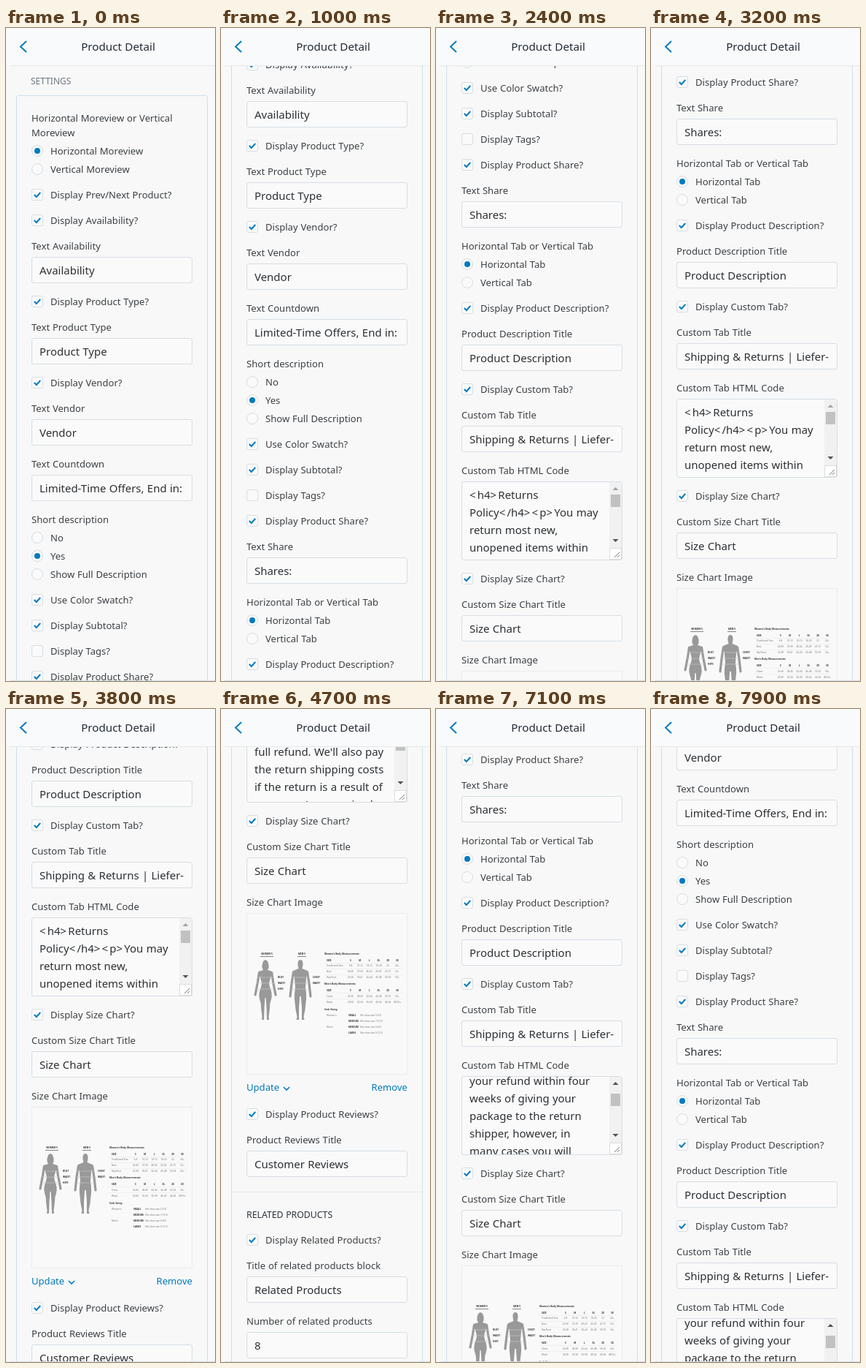
Write an HTML page that moves like this. It is 287x893 px and loops after 8 s.

```html
<!DOCTYPE html>
<html lang="en">
<head>
<meta charset="utf-8">
<title>Product Detail</title>
<style>
html, body { margin: 0; width: 100%; height: 100%; overflow: hidden; background: #f8f8f8; }
svg { display: block; }
text { font: 13.08px "Noto Sans", "Open Sans", sans-serif; word-spacing: .4px; fill: #3b4045; white-space: pre; }
.field { font-size: 14.98px; fill: #2c3034; }
.angle { letter-spacing: 2.2px; }
.title { font-size: 15.2px; font-weight: 500; fill: #212b36; }
.head { font-size: 12px; font-weight: 500; fill: #6b7580; }
.dark { font-size: 12.3px; fill: #2b333b; }
.link { fill: #007ab8; }
.tiny { font-size: 3.2px; word-spacing: 0; fill: #777; }
.bold { font-weight: 700; fill: #333; }
.box { fill: #fafafa; stroke: #d5dee6; }
.tick { fill: none; stroke: #007ac0; stroke-width: 2; }
.edge { fill: none; stroke: #cfdfec; }
.arm { fill: none; stroke: #999; stroke-width: 3.2; stroke-linecap: round; stroke-linejoin: round; }
</style>
</head>
<body>
<svg width="287" height="893" viewBox="0 0 287 893">
  <svg y="52" width="287" height="840"><g id="page"></g></svg>
  <rect width="287" height="51" fill="#f9fafb"/>
  <path d="M5 51.5H287" stroke="#e4e9ed"/>
  <path d="M5 892.5H287" stroke="#d6e2ec"/>
  <path d="M28 18L20 25.5L28 33" class="tick"/>
  <text x="154" y="31" text-anchor="middle" class="title">Product Detail</text>
</svg>
<script>
const page = document.getElementById("page");
let out = "";
const add = s => out += s;
const esc = s => s.replace(/[&<>]/g, c => c === "&" ? "&amp;" :
  `<tspan class="angle">${c === "<" ? "&lt;" : "&gt;"}</tspan>`);
const text = (x, y, s, cls = "", extra = "") =>
  add(`<text x="${x}" y="${y}" class="${cls}" ${extra}>${esc(s)}</text>`);

// Form parts are placed by their vertical centre.
const label = (y, s) => text(35, y + 5, s);
const check = (y, s, on = true) => {
  add(`<rect x="35.5" y="${y - 7.5}" width="15" height="15" rx="2.5" class="box"/>`);
  if (on) add(`<path d="M38.8 ${y}l3 3l5.4-6" class="tick"/>`);
  text(61, y + 5, s);
};
const radio = (y, s, on) => {
  add(`<circle cx="43" cy="${y}" r="7.5" class="box"/>`);
  if (on) add(`<circle cx="43" cy="${y}" r="4" fill="#007ac0"/>`);
  text(61, y + 5, s);
};
const input = (y, name, s) => {
  label(y - 33, name);
  add(`<rect x="35.5" y="${y - 17.5}" width="220" height="35" rx="2.5" class="box"/>`);
  text(46, y + 6, s, "field");
};

function textArea(y) {
  const lines = ["<h4>Returns", "Policy</h4><p>You may", "return most new,",
    "unopened items within", "30 days of delivery for a", "full refund. We'll also pay",
    "the return shipping costs", "if the return is a result of", "our error (you received an",
    "incorrect or defective", "item, etc.).</p><p>You", "should expect to receive",
    "your refund within four", "weeks of giving your", "package to the return",
    "shipper, however, in", "many cases you will", "receive a refund more"];
  add(`<rect x="35.5" y="${y + .5}" width="220" height="107" rx="2.5" class="box"/>
    <svg x="36" y="${y + 1}" width="202" height="106"><g id="lines">`);
  lines.forEach((s, i) => text(10, 23 + 24 * i, s, "field"));
  add(`</g></svg><g transform="translate(238 ${y + 1})">
    <rect width="17" height="90" fill="#f1f1f1"/>
    <path id="up" d="M4.5 11L8.5 7L12.5 11Z"/>
    <path d="M4.5 78L8.5 82L12.5 78Z" fill="#505050"/>
    <rect id="thumb" x="2" y="17" width="13" height="17" fill="#c1c1c1"/>
    <rect x=".5" y="90.5" width="16" height="15" fill="#fff" stroke="#dcdcdc"/>
    <path d="M7 103L14 96M11 103L14 100" stroke="#777"/></g>`);
}

function sizeChart(top) {
  add(`<g transform="translate(0 ${top})">
    <rect x="35.5" y=".5" width="220" height="220" fill="#f9f9f9" stroke="#ececec"/>`);
  // Each figure is one half and its mirror image.
  const body = (x, half, arm) => {
    for (const side of [1, -1])
      add(`<g transform="translate(${x} 64) scale(${side} 1)">
        <path d="${half}" fill="#999"/><path d="${arm}" class="arm"/></g>`);
    add(`<path d="M${x - 12} 88h24m-24 8h24m-24 8h24" stroke="#ccc" stroke-width=".6"/>`);
  };
  body(61, "M0 0Q5 1 4.5 11L3 14L9.5 16L7 25Q4 32 6 37Q10 46 8 54Q5.5 60 6 66L4.5 78L5 82H2L1.5 66L.6 52H0Z",
    "M8.6 17.5L10.5 30L14 48");
  body(109, "M0 0Q4 0 3.5 7L2.5 12L10 15L8 26L7 38Q9 50 7.5 58L6.5 68L4.5 78L5.5 82H2L2 66L.8 50H0Z",
    "M9.6 17L11.8 31L14 50");
  const mid = 'text-anchor="middle"';
  const tiny = (x, y, s, bold, extra) => text(x, y + 1.2, s, bold ? "tiny bold" : "tiny", extra);
  tiny(63, 56, "WOMEN'S", 1, mid);
  tiny(111, 56, "MEN'S", 1, mid);
  add('<path d="M54 59.5h18M105 59.5h12" stroke="#555" stroke-width=".7"/>');
  ["BUST", "WAIST", "HIPS"].forEach((s, i) => tiny(78, 88 + 8 * i, s, 1));
  ["CHEST", "WAIST"].forEach((s, i) => tiny(126, 88 + 8 * i, s, 1));
  const row = (y, name, cells, bold) => {
    tiny(145, y, name, bold);
    cells.split(" ").forEach((s, i) => tiny(178 + 12.8 * i, y, s, bold, mid));
  };
  const sizes = "S M L XL 2X 3X";
  tiny(142, 56, "Women's Body Measurements", 1);
  row(65, "SIZE", sizes, 1);
  row(72, "Traditional Size", "6-8 10-12 14-16 18-20 22 24+");
  row(80, "Bust", "34-36 37-39 40-42 43-45 47-51 52+");
  row(88, "Hip/Seat", "36-38 39-41 42-44 45-48 50-53 54+");
  tiny(142, 97, "Men's Body Measurements", 1);
  row(106, "SIZE", sizes, 1);
  row(114, "Chest", "34-36 38-40 42-44 46-48 50-52 54+");
  row(122, "Waist", "28-30 32-34 36-38 40-42 44-46 48-50+");
  for (const y of [68, 76, 84, 109, 117])
    add(`<path d="M142 ${y + .5}h106" stroke="#e4e4e4" stroke-width=".5"/>`);
  tiny(142, 132, "Sock Sizing", 1);
  [["Women's", "SMALL", "5-6.5"], ["", "MEDIUM", "7-10.5"],
   ["Men's", "MEDIUM", "6-8.5"], ["", "LARGE", "9-12.5"]].forEach(([who, size, fit], i) => {
    const y = 140 + 8 * i;
    tiny(145, y, who);
    tiny(175, y, size, 1);
    tiny(191, y, `(fits shoe size ${fit})`);
  });
  add("</g>");
}

text(34, 77, "SETTINGS", "head");
add('<path d="M14.5 2400V94.5q0-2 2-2H274.5q2 0 2 2V2400" class="edge"/>');
label(123, "Horizontal Moreview or Vertical");
label(143, "Moreview");
radio(168, "Horizontal Moreview", true);
radio(193, "Vertical Moreview");
check(228, "Display Prev/Next Product?");
check(263, "Display Availability?");
input(331, "Text Availability", "Availability");
check(374, "Display Product Type?");
input(442, "Text Product Type", "Product Type");
check(485, "Display Vendor?");
input(553, "Text Vendor", "Vendor");
input(629, "Text Countdown", "Limited-Time Offers, End in:");
label(672, "Short description");
radio(697, "No");
radio(722, "Yes", true);
radio(747, "Show Full Description");
check(782, "Use Color Swatch?");
check(817, "Display Subtotal?");
check(852, "Display Tags?", false);
check(887, "Display Product Share?");
input(955, "Text Share", "Shares:");
label(998, "Horizontal Tab or Vertical Tab");
radio(1023, "Horizontal Tab", true);
radio(1048, "Vertical Tab");
check(1083, "Display Product Description?");
input(1151, "Product Description Title", "Product Description");
check(1194, "Display Custom Tab?");
input(1262, "Custom Tab Title", "Shipping & Returns | Liefer-");
label(1305, "Custom Tab HTML Code");
textArea(1320);
check(1453, "Display Size Chart?");
input(1521, "Custom Size Chart Title", "Size Chart");
label(1564, "Size Chart Image");
sizeChart(1579);
text(35, 1822, "Update", "link");
add('<path d="M86 1817l4 4l4-4" class="tick" style="stroke-width:1.6"/>');
text(256, 1822, "Remove", "link", 'text-anchor="end"');
check(1854, "Display Product Reviews?");
input(1922, "Product Reviews Title", "Customer Reviews");
add('<path d="M15 1960.5H276" stroke="#e3e9ee"/>');
text(35, 1996, "RELATED PRODUCTS", "head dark");
check(2026, "Display Related Products?");
input(2094, "Title of related products block", "Related Products");
input(2170, "Number of related products", "8");
page.innerHTML = out;

// Wheel turns: start ms, duration ms, distance px.
const pageTurns = [[446, 350, 200], [944, 250, 100], [1446, 350, 200], [2046, 350, 200],
  [2644, 250, 100], [3146, 350, 200], [3700, 250, 100], [4346, 350, 200],
  [5644, 250, -200], [6244, 250, -100], [6846, 540, -400], [7710, 350, -200]];
const areaTurns = [[4500, 200, 100], [4944, 250, 200]];
const smooth = u => u * u * (3 - 2 * u);
const scrollAt = (turns, t) => Math.round(turns.reduce((sum, [start, span, dist]) =>
  sum + dist * smooth(Math.min(1, Math.max(0, (t - start) / span))), 0));

const [lines, thumb, up] = ["lines", "thumb", "up"].map(id => document.getElementById(id));
function draw() {
  // The picture advances in steps of a tenth of a second.
  const t = Math.floor(performance.now() % 8000 / 100) * 100;
  const inner = scrollAt(areaTurns, t);
  page.setAttribute("transform", `translate(0 ${-52 - scrollAt(pageTurns, t)})`);
  lines.setAttribute("transform", `translate(0 ${-inner})`);
  thumb.setAttribute("y", 17 + Math.round(inner / 50));
  up.setAttribute("fill", inner ? "#505050" : "#a3a3a3");
  requestAnimationFrame(draw);
}
draw();
</script>
</body>
</html>
```
